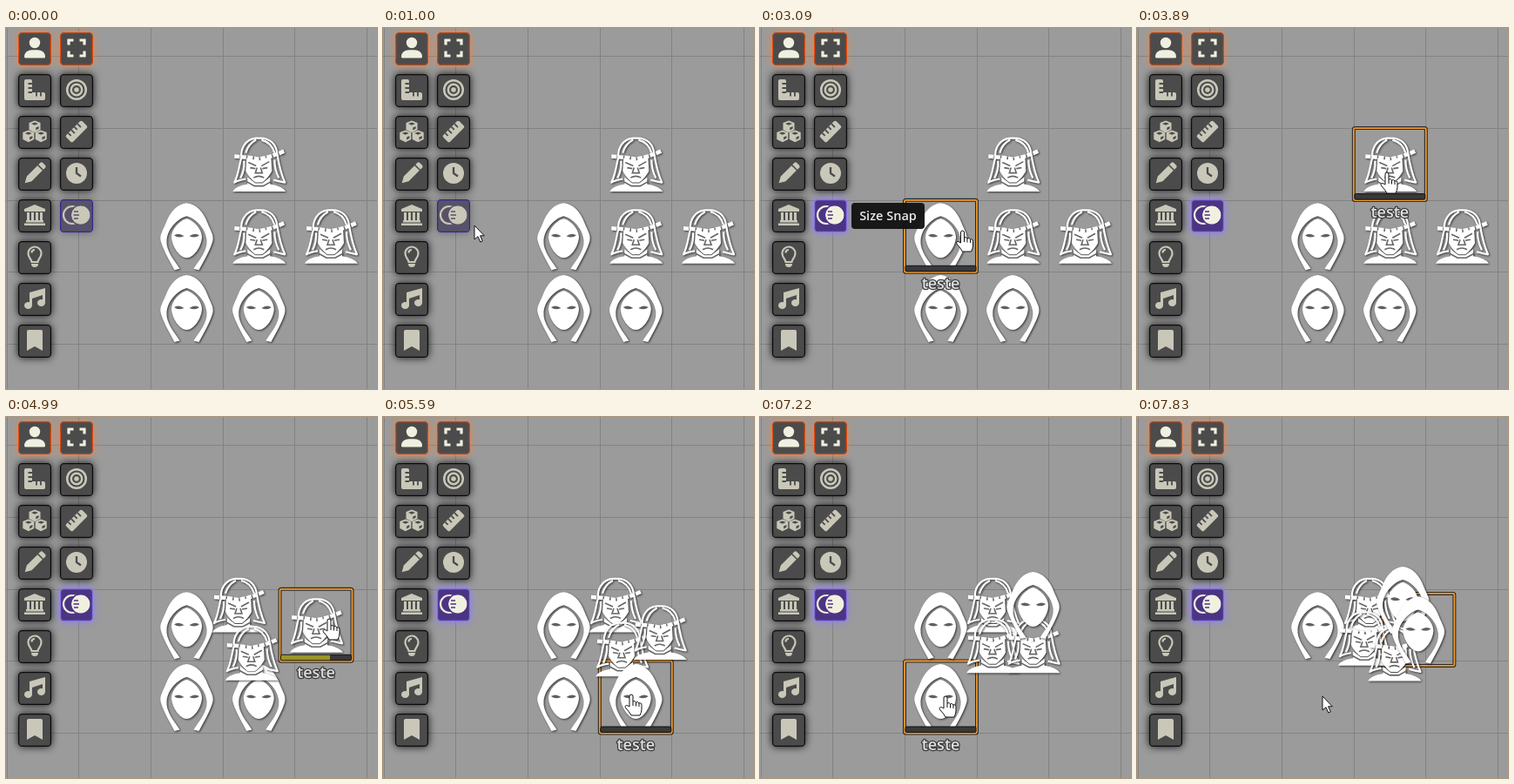
Recreate the animation shown at these times as an HTML page. Size 426x415 px, loop 8 s.

```html
<!DOCTYPE html>
<html lang="en">
<head>
<meta charset="utf-8">
<style>
html, body { margin: 0; width: 100%; height: 100%; overflow: hidden; background: #9b9b9b; }
svg { display: block; width: 426px; height: 415px; }
text { font-family: "Open Sans", "Noto Sans", sans-serif; font-weight: 600; }
.btn { fill: #4b4b4b; stroke: #0c0c0c; stroke-width: 1.2; filter: drop-shadow(0 0 5px rgba(0,0,0,.9)); }
.btn.on { stroke: url(#rim); filter: drop-shadow(0 0 4px rgba(255,130,50,.75)); }
.ico { fill: #c9c7b8; stroke: #c9c7b8; stroke-width: 0; }
.ico.on { fill: #f0f0e0; stroke: #f0f0e0; }
.ln { fill: none; stroke-width: 2.5; }
.cut { fill: none; stroke: #4b4b4b; stroke-width: 1.8; }
.hole { fill: #4b4b4b; }
.art { fill: #fff; filter: drop-shadow(1px 1.5px 1.2px rgba(0,0,0,.65)); }
.hair { fill: none; stroke: #fff; stroke-width: 2.2; stroke-linejoin: round; }
.ink { fill: none; stroke: #666; stroke-width: 1.6; }
.name { font-size: 18px; text-anchor: middle; fill: #dedede; stroke: #3c3c3c; stroke-width: 2.5; paint-order: stroke; stroke-linejoin: round; }
</style>
</head>
<body>
<svg id="stage" viewBox="0 0 426 415">
  <defs>
    <linearGradient id="rim" x1="0" y1="0" x2="0" y2="1">
      <stop offset="0" stop-color="#b8481c"/><stop offset=".5" stop-color="#ff4400"/><stop offset="1" stop-color="#b8481c"/>
    </linearGradient>
    <g id="hood" class="art">
      <path d="M0-38C-11-37-19-28-24-15C-28-5-31-2-30 5C-28 14-20 28-14 39L-8 37.500C-14 28-24 17-23 5C-22-8-11-20 0-23C11-20 22-8 23 5C24 17 14 28 8 37.500L14 39C20 28 28 14 30 5C31-2 28-5 24-15C19-28 11-37 0-38z"/>
      <path d="M0-20C8-18 17-9 17.500 1C17 12 8 25 0 25C-8 25-17 12-17.500 1C-17-9-8-18 0-20z"/>
      <path fill="#606060" d="M-14.500-1Q-9-4.500-3 0Q-10 3-14.500-1zM14.500-1Q9-4.500 3 0Q10 3 14.500-1z"/>
    </g>
    <g id="face" class="art">
      <path class="hair" d="M-15 17Q-23 18-28 21C-23 11-23 3-20-8C-21-17-16-29-3-30H2C14-30 20-22 21-12C23 0 25 10 30 21Q24 20 17 18M-3-28C-9-25-13-20-15-13M3-28C11-26 16-20 18-13M-21 16Q-16 6-17-4M18-5Q18 6 23 16"/>
      <path d="M-14-7L0-4L14-9L15 8C12 14 7 19 4 21H-4C-7 19-12 14-15 8z"/>
      <path d="M-30 31.500Q-27 25-13 23V15L-4 22H4L13 15V23Q27 25 31 31.500z"/>
      <path class="hair" style="stroke-width:4.500;stroke-dasharray:6 1.500" d="M-28-9Q-12-8 0-6Q14-8 29-15"/>
      <path class="ink" d="M-12-2L-3 2M12-3L3 2M-10 4l6 1M10 4l-6 1M-2 4l-2 6h8l-2-6M-6 15.500Q0 12 6 15.500M-14 20L-5 25H5L14 20"/>
    </g>
    <path id="arrow" fill="#fff" stroke="#111" d="M0-1V15L4 11.700L6.800 18L9.300 16.900L6.600 10.800H11.300z"/>
    <path id="hand" fill="#fff" stroke="#111" stroke-linejoin="round" d="M-2 13V1Q-2-1 0-1Q2-1 2 1V7Q4 5.500 5.500 8Q7.500 6.500 9 9Q12 8 12 11.500V16Q12 19 10 23H0Q-2 19-6 15Q-8 12-5.500 11.500Q-4 11.500-2 13zM2 7V12M5.500 8V12.500M9 9V13"/>
  </defs>
  <rect width="426" height="415" fill="#9b9b9b"/>
  <path id="grid" stroke="#828282"/>
  <g id="boxes"></g>
  <g id="tokens"></g>
  <g id="labels"></g>
  <g id="tools"></g>
  <g id="tip">
    <rect x="105" y="201" width="84" height="30" rx="4" fill="#111"/>
    <text x="147" y="221" text-anchor="middle" font-size="14.500" fill="#eee">Size Snap</text>
  </g>
  <use id="cursor"/>
</svg>
<script>
const NS = 'http://www.w3.org/2000/svg', LOOP = 8000, CELL = 82.7;
const $ = id => document.getElementById(id);

function add(parent, tag, attrs, html) {
  const el = document.createElementNS(NS, tag);
  for (const k in attrs) el.setAttribute(k, attrs[k]);
  if (html) el.innerHTML = html;
  return parent.appendChild(el);
}

let lines = '';
for (let i = 0; i < 6; i++) lines += `M${Math.floor(1 + i * CELL) + .5} 0V415M0 ${Math.floor(32.7 + i * CELL) + .5}H426`;
$('grid').setAttribute('d', lines);

// Toolbar icons, centred on their button
const cube = (x, y) => `<g transform="translate(${x} ${y})"><path d="M0-7L6.500-4.500V3.500L0 6.800L-6.500 3.500V-4.500z"/>
  <path class="hole" d="M0-5L4-3.400L0-1.800L-4-3.400zM1.300 1L4.600-.5V2.300L1.300 4z"/></g>`;
const icons = [[
  '<circle cy="-6" r="6.200"/><path d="M-12 10C-12 5-8 2.200-3 2.200H3C8 2.200 12 5 12 10Q12 11.500 10.500 11.500H-10.500Q-12 11.500-12 10z"/>',
  '<path d="M-10-12H-5Q-3-12-3-10V3H10Q12 3 12 5V10Q12 12 10 12H-10Q-12 12-12 10V-10Q-12-12-10-12z"/><path class="cut" d="M-3-7H-7.500M-3-2H-7.500M-3 3H-7.500M2 3V7.500M7 3V7.500"/>',
  cube(0, -5.5) + cube(-7.2, 5.5) + cube(7.2, 5.5),
  '<path transform="rotate(45)" d="M-4-13Q-4-15-2-15H2Q4-15 4-13V-10H-4zM-4-8.500H4V9L0 16L-4 9z"/>',
  '<path d="M-12-7L0-12L12-7V-4H-12zM-9-3H-6V6H-9zM-4-3H-1V6H-4zM1-3H4V6H1zM6-3H9V6H6zM-10 6H10V8.500H-10zM-12 9.500H12V12H-12z"/>',
  '<path class="ln" style="stroke-width:2.200" d="M-3.500 6C-4 2-7.500 1-7.500-4A7.500 7.500 0 0 1 7.500-4C7.500 1 4 2 3.500 6zM-3.500-4.500Q-3.500-8 0-8"/><path d="M-4 8H4Q4 12 0 12Q-4 12-4 8z"/>',
  '<ellipse cx="-7.500" cy="8" rx="4.500" ry="4"/><ellipse cx="7.500" cy="5" rx="4.500" ry="4"/><path d="M-6-7L12-12V5H9V-4L-3 0V8H-6z"/>',
  '<path d="M-9-10Q-9-12-7-12H7Q9-12 9-10V12L0 7L-9 12z"/>'
], [
  '<path class="ln" style="stroke-width:3.200" d="M-9-3.500V-9H-3.500M3.500-9H9V-3.500M9 3.500V9H3.500M-3.500 9H-9V3.500"/>',
  '<circle class="ln" r="10.800"/><circle class="ln" r="6.200"/><circle r="2.800"/>',
  '<g transform="rotate(-45)"><rect x="-13" y="-5.500" width="26" height="11" rx="2"/><path class="cut" d="M-8-5.500V-1M-3-5.500V0M2-5.500V-1M7-5.500V0"/></g>',
  '<circle r="12"/><path class="cut" style="stroke-width:2.300" d="M0-7V0L5 3.500"/>',
  '<circle class="ln" cx="-5" r="10" style="stroke-width:2.200"/><circle cx="4.800" r="10.800"/><circle class="cut" cx="4.800" r="11.500" style="stroke-width:1.500"/><path class="cut" d="M-3-4H2M-3.500 0H3M-3 4H2" style="stroke-width:1.600"/>'
]];
let toggle, toggleIcon;
icons.forEach((col, c) => col.forEach((svg, r) => {
  const x = 33 + c * 48, y = 24 + r * 48, on = r ? '' : ' on';
  toggle = add($('tools'), 'rect', { class: 'btn' + on, x: x - 18.4, y: y - 18.4, width: 36.8, height: 36.8, rx: 4 });
  toggleIcon = add($('tools'), 'g', { class: 'ico' + on, transform: `translate(${x} ${y - 1})` }, svg);
}));
const toggleCuts = toggleIcon.querySelectorAll('.cut');

// Linear interpolation through [time, x, y] stops
function along(t, stops) {
  let a = stops[0];
  for (const b of stops) {
    if (t < b[0]) {
      const k = b === a ? 0 : (t - a[0]) / (b[0] - a[0]);
      return [a[1] + (b[1] - a[1]) * k, a[2] + (b[2] - a[2]) * k];
    }
    a = b;
  }
  return [a[1], a[2]];
}
const ramp = (t, a, b) => Math.min(1, Math.max(0, (t - a) / (b - a)));

// Tokens that share a cell spread evenly on a circle around its centre
const X = [207.5, 290.3, 373], Y = [156.6, 239.3, 322];
function slot(t, k, n) {
  const a = (-135 + 360 * k / n) * Math.PI / 180;
  return [t, X[1] + 33 * Math.cos(a), Y[1] + 33 * Math.sin(a)];
}

const tokens = [
  { art: 'hood', path: [[0, X[0], Y[1]]] },
  { art: 'hood', sel: [5440, 6900], raise: 5440, path: [[5590, X[1], Y[2]], slot(5890, 1, 4), slot(7390, 1, 4), slot(7690, 1, 5)] },
  { art: 'hood', sel: [6900, LOOP], raise: 6900, path: [[7190, X[0], Y[2]], slot(7790, 2, 5)] },
  { art: 'face', sel: [3780, 4740], path: [[4090, X[1], Y[0]], slot(4490, 0, 2)] },
  { art: 'face', path: [[4190, X[1], Y[1]], slot(4490, 1, 2), slot(4890, 1, 2), slot(4985, 2, 3), slot(5480, 2, 3), slot(5690, 3, 4), slot(7390, 3, 4), slot(7690, 4, 5)] },
  { art: 'face', hp: .7, sel: [4740, 5440], path: [[4890, X[2], Y[1]], [4990, 356, Y[1]], slot(5190, 1, 3), slot(5480, 1, 3), slot(5690, 2, 4), slot(7390, 2, 4), slot(7690, 3, 5)] }
];
for (const k of tokens) {
  k.box = add($('boxes'), 'g', { fill: 'none' }, ['#2a2a2a" stroke-width="4', '#f29a2c" stroke-width="1.800']
    .map(s => `<rect x="-41.500" y="-41.500" width="83" height="83" rx="1.500" stroke="${s}"/>`).join(''));
  k.el = add($('tokens'), 'use', { href: '#' + k.art });
  k.label = add($('labels'), 'g', {}, `<rect x="-40.500" y="34" width="81" height="6.500" rx="1.500" fill="#393939" stroke="#111"/>
    <rect x="-40" y="34.500" width="${80 * (k.hp || 0)}" height="5.500" fill="#98962a"/><text class="name" y="61">teste</text>`);
}

const pointer = [
  [100, 298, 330], [300, 272, 312], [500, 232, 282], [700, 160, 250], [900, 114, 232], [1000, 105, 228],
  [1100, 88, 222], [1200, 79, 221], [2590, 79, 221], [2790, 120, 228], [2990, 195, 238], [3190, 270, 230],
  [3490, 287, 167], [4290, 287, 167], [4690, 371, 233], [5140, 371, 233], [5440, 285, 320],
  [6390, 285, 320], [6890, 213, 322]
];

let front = -1;
function draw(t) {
  const [px, py] = along(t, pointer), shown = t >= 100;
  let hover = null;
  for (const k of tokens) {
    k.pos = along(t, k.path);
    if (shown && Math.abs(px - k.pos[0]) < 42 && Math.abs(py - k.pos[1]) < 42) hover = k;
  }
  for (const k of tokens) {
    const at = `translate(${k.pos[0].toFixed(2)} ${k.pos[1].toFixed(2)})`;
    for (const el of [k.box, k.el, k.label]) el.setAttribute('transform', at);
    const selected = k.sel && t >= k.sel[0] && t < k.sel[1];
    k.box.style.display = selected || k === hover ? '' : 'none';
    k.label.style.display = k === hover ? '' : 'none';
  }
  // A picked hood comes to the front
  const raised = tokens.filter(k => k.raise && t >= k.raise);
  if (front !== raised.length) {
    front = raised.length;
    for (const k of tokens.filter(k => !raised.includes(k)).concat(raised)) $('tokens').append(k.el);
  }

  const lit = ramp(t, 1000, 1200), full = ramp(t, 1490, 1690);
  const mix = (a, b, k) => `rgb(${a.map((v, i) => Math.round(v + (b[i] - v) * k))})`;
  const fill = mix([88, 82, 104], [76, 52, 132], Math.max(lit * .5, full));
  toggle.style.fill = fill;
  for (const el of toggleCuts) el.style.stroke = fill;
  toggle.style.stroke = mix([50, 38, 150], [130, 115, 225], lit);
  toggle.style.filter = `drop-shadow(0 0 4px rgba(0,0,0,${.35 * (1 - lit)})) drop-shadow(0 0 5px rgba(140,125,255,${lit}))`;
  toggleIcon.style.fill = toggleIcon.style.stroke = mix([201, 199, 184], [240, 240, 224], full);
  $('tip').setAttribute('opacity', .95 * ramp(t, 1490, 1790) * (1 - ramp(t, 3190, 3590)));

  const onButton = px > 62 && px < 100 && py > 197 && py < 235;
  $('cursor').setAttribute('href', hover || onButton ? '#hand' : '#arrow');
  $('cursor').setAttribute('transform', `translate(${px.toFixed(1)} ${py.toFixed(1)})`);
  $('cursor').style.display = shown ? '' : 'none';
}

const step = t => t < 1500 ? Math.floor(t / 100) * 100 : Math.floor((t + 10) / 100) * 100 - 10;
const start = performance.now();
function tick() {
  draw(step((performance.now() - start) % LOOP));
  requestAnimationFrame(tick);
}
tick();
</script>
</body>
</html>
```
